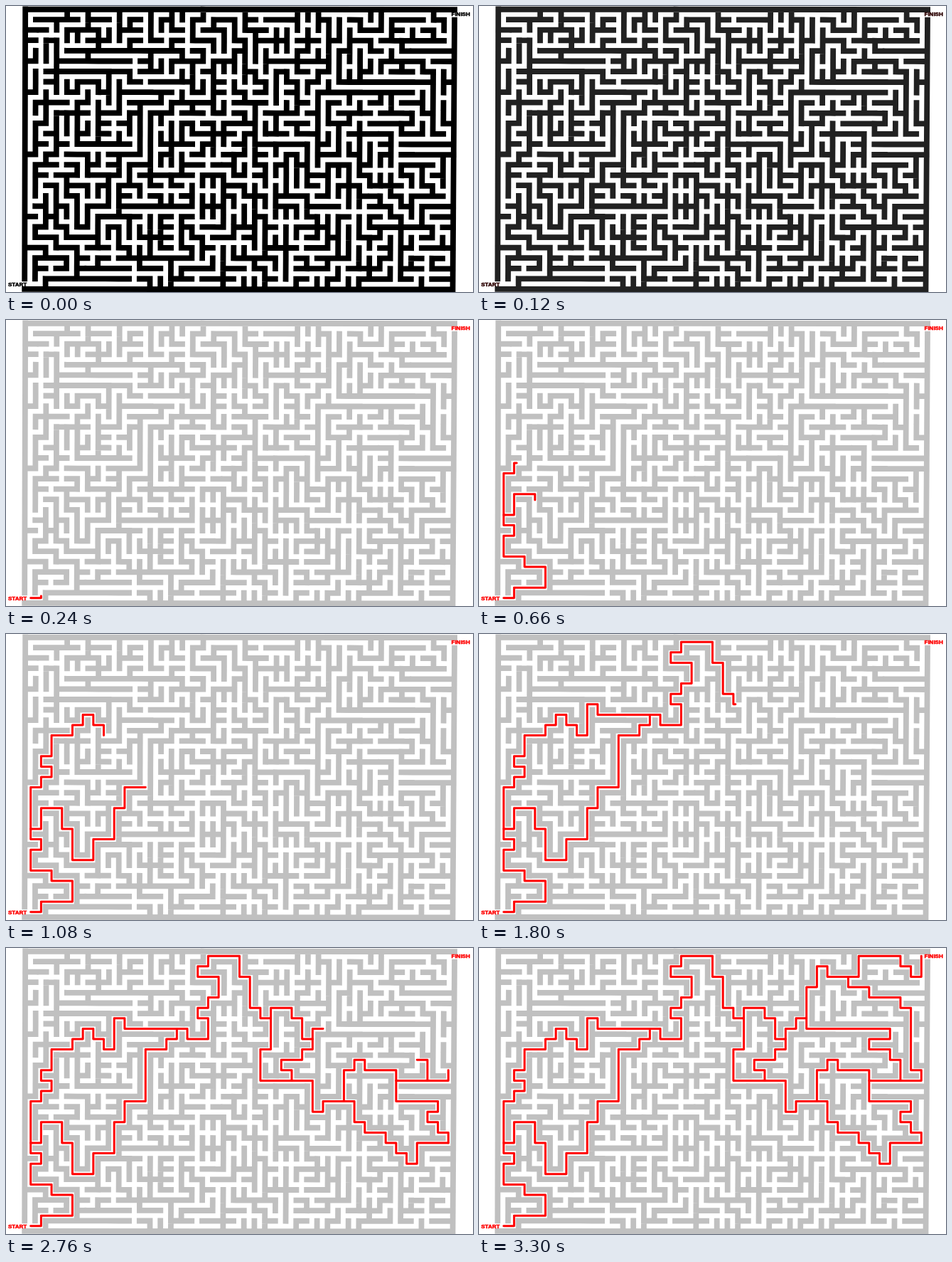
Write an HTML page that moves like this. It is 657 px wide and 402 px high and loops after 3330 ms.

```html
<!DOCTYPE html>
<html lang="en">
<head>
<meta charset="utf-8">
<title>Maze</title>
<style>
html, body { margin: 0; width: 100%; height: 100%; overflow: hidden; background: #fff; }
svg { display: block; }
text { font: bold 8px "Liberation Sans", Arial, sans-serif; stroke-width: .5; }
#walls { fill: none; stroke-width: 7.8; stroke-linecap: square; }
#trails { fill: none; stroke: #f00; stroke-width: .205; stroke-linecap: round; stroke-linejoin: round; }
</style>
</head>
<body>
<svg width="657" height="402" viewBox="0 0 657 402">
  <path id="walls"/>
  <g id="labels"><text x="3" y="394">START</text><text x="626.5" y="14">FINISH</text></g>
  <g id="trails" transform="translate(34.7 11.2) scale(14.69 14.6)"></g>
</svg>
<script>
const COLS = 41, ROWS = 27, LOOP = 3330, HOLD = 120, STEP = 60;
const $ = id => document.getElementById(id);

// Each trail: its course in maze cells, and [step, length drawn] keys.
const trails = [
  { d: 'M0 26h1v-1h3v-2h-2v-1h-2v-2h1v-1h-1v-5h1v-1h1v-1h-1v-1h1v-2h2v-1h1v-1h1v1h1v1h1v-3h1v1h6v1h2v-2h-1v-1h1v-1h1v-2h-2v-1h1v-1h3v2h1v3h1v1h1v-1h2v1h1v2h1',
    keys: [[2, 0], [3, 1.2], [9, 22], [17, 40], [18, 44], [27, 73.9], [29, 80.2], [31, 83], [36, 85], [38, 89]] },
  { d: 'M0 18h1v-2h2v2h1v3h2v-2h2v-3h1v-2h2v-5h2v-1h1v-1',
    keys: [[8, 0], [17, 25], [18, 32], [19, 35]] },
  { d: 'M23 6v3h-1v3h5v3h1v-1h3v2h1v1h2v1h1v1h1v1h1v-2h3',
    keys: [[29.4, 0], [36, 27], [45, 37]] },
  { d: 'M25 12v-1h-1v-1h2v-1h1v-2h1v-1h1v-3h1v-2h1v1h3v-2h4v1h1v1h1v-2',
    keys: [[32, 0], [36, 4.2], [45, 10], [54, 35]] },
  { d: 'M30 14v-3h1v-1h1v1h3v1h5v-1h-1v-6h-1v-1h-3v-1h-2v-1',
    keys: [[34, 0], [36, 8], [45, 17], [54, 33]] },
  { d: 'M35 12v2h4v1h-1v1h1v1h1v1', keys: [[39, 0], [45, 13]] },
  { d: 'M38 12v-2h-1v-1h-2v-1h2v-1h-8v-1', keys: [[42, 0], [45, 3], [54, 19]] }
];

// Prominent long walls, in grid corners; the rest of the maze is seeded.
const longWalls = 'M3 5h7M4 6h6M4 4h9M3 3v3M10 8h4M5 25h4M5 26h4M9 24h7M9 19h6M5 13h5M29 8h8M32 7h5M32 5v2' +
  'M23 5h6M23 13h4M35 3h5M36 4h5M36 13h4M36 14h4M36 15h3M33 21h6M29 1v5M4 10v2M5 9v4M7 9v4M31 15v4M25 14h1v3M25 14v4h2';

// Calls visit(x, y, horizontal) for every unit step of a path.
function walk(d, visit) {
  let x = 0, y = 0;
  for (const [, cmd, a, b] of d.matchAll(/([Mhv])(-?\d+)(?: (\d+))?/g)) {
    if (cmd === 'M') { x = +a; y = +b; continue; }
    const dir = Math.sign(a);
    for (let n = Math.abs(a); n--;) {
      if (cmd === 'h') { visit(Math.min(x, x + dir), y, true); x += dir; }
      else { visit(x, Math.min(y, y + dir), false); y += dir; }
    }
  }
}

let seed = 20;
const random = () => (seed = (seed * 1664525 + 1013904223) % 4294967296) / 4294967296;

// An edge is the east (even) or south (odd) side of a cell.
const edge = (x, y, east) => 2 * (y * COLS + x) + (east ? 0 : 1);
const sides = e => [e >> 1, (e >> 1) + (e % 2 ? COLS : 1)];

function buildMaze() {
  const open = new Set(), solid = new Set(), onTrail = new Set();
  const parent = Array.from({ length: COLS * ROWS }, (_, i) => i);
  const root = i => parent[i] === i ? i : (parent[i] = root(parent[i]));
  const join = e => {
    const [a, b] = sides(e).map(root);
    parent[a] = b;
    return a !== b;
  };
  for (const { d } of trails) walk(d, (x, y, h) => {
    const e = edge(x, y, h);
    open.add(e);
    join(e);
    sides(e).forEach(cell => onTrail.add(cell));
  });
  walk(longWalls, (x, y, h) => solid.add(h ? edge(x, y - 1, false) : edge(x - 1, y, true)));

  // Side branches off the trails are rare, gaps in long walls rarer.
  const rank = e => random() + (solid.has(e) ? 2 : 0) + (sides(e).some(c => onTrail.has(c)) ? .6 : 0);
  const edges = [];
  for (let y = 0; y < ROWS; y++) for (let x = 0; x < COLS; x++) for (const east of [true, false]) {
    if (east ? x === COLS - 1 : y === ROWS - 1) continue;
    const id = edge(x, y, east);
    edges.push({ x, y, east, id, rank: rank(id) });
  }
  edges.sort((a, b) => a.rank - b.rank);
  for (const { id } of edges) if (join(id)) open.add(id);
  return edges.filter(e => !open.has(e.id));
}

// Grid corner to stage, with the slight skew of the sheet.
const corner = (i, j) =>
  `${(27.2 - j * .037 + i * (14.73 - j * .0015)).toFixed(1)} ${(4.5 + j * 14.57 + i * .015).toFixed(1)}`;
const line = (a, b, c, d) => `M${corner(a, b)}L${corner(c, d)}`;

$('walls').setAttribute('d',
  line(0, 0, COLS, 0) + line(0, ROWS, COLS, ROWS) +
  line(0, 0, 0, ROWS - 1) + line(COLS, 1, COLS, ROWS) +
  buildMaze().map(({ x, y, east }) =>
    east ? line(x + 1, y, x + 1, y + 1) : line(x, y + 1, x + 1, y + 1)).join(''));

for (const trail of trails) {
  trail.el = document.createElementNS('http://www.w3.org/2000/svg', 'path');
  trail.el.setAttribute('d', trail.d);
  $('trails').append(trail.el);
}

function lengthAt(keys, k) {
  const n = keys.findIndex(([at]) => at >= k);
  if (n < 0) return keys[keys.length - 1][1];
  if (n === 0) return 0;
  const [k0, v0] = keys[n - 1], [k1, v1] = keys[n];
  return v0 + (v1 - v0) * (k - k0) / (k1 - k0);
}

const fade = [0, .17, .55, 1];

function draw() {
  const t = performance.now() % LOOP;
  const k = t < HOLD ? 0 : Math.floor((t - HOLD) / STEP) + 1;
  const f = fade[Math.min(k, 3)], grey = Math.round(192 * f);
  const red = `rgb(${Math.round(255 * f)},0,0)`;
  $('walls').style.stroke = `rgb(${grey},${grey},${grey})`;
  $('labels').style.fill = $('labels').style.stroke = red;
  for (const { el, keys } of trails) {
    const len = lengthAt(keys, k);
    el.style.display = len > 0 ? '' : 'none';
    el.style.strokeDasharray = `${len} 999`;
  }
  requestAnimationFrame(draw);
}
draw();
</script>
</body>
</html>
```
